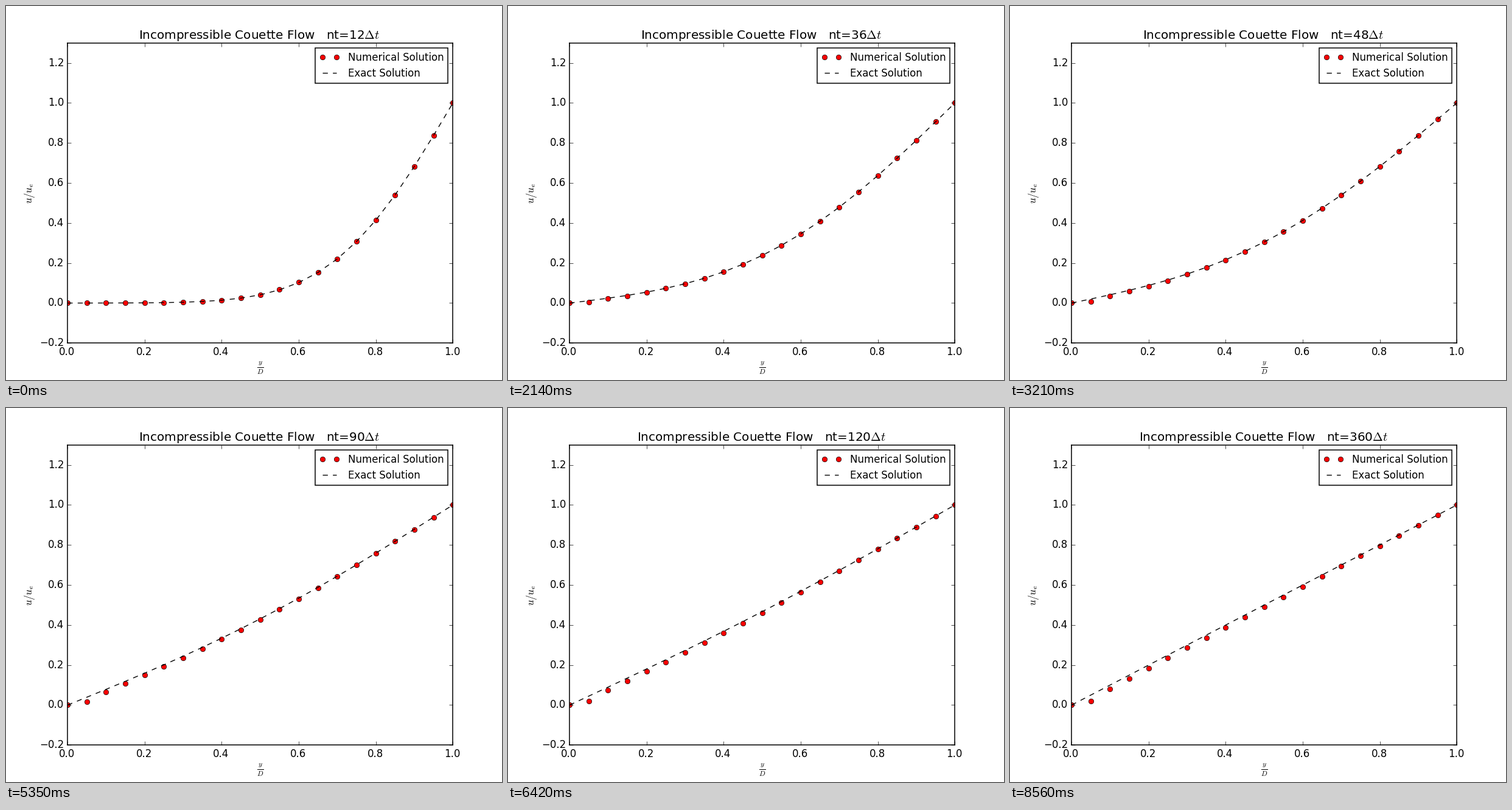
A matplotlib script for the animation above (9.63 s loop, 815 by 615 pixels).

```python
import numpy as np
import matplotlib.pyplot as plt
from matplotlib.animation import FuncAnimation
from matplotlib.transforms import ScaledTranslation

plt.style.use('classic')
plt.rcParams.update({
    'font.family': 'DejaVu Sans',
    'figure.dpi': 100,
    'savefig.dpi': 100,
    'figure.facecolor': 'white',
    'savefig.facecolor': 'white',
    'legend.fontsize': 'medium',
    'axes.labelpad': 3.5,
    'axes.linewidth': 1.09,     # rounds to two pixels when snapped
    'patch.linewidth': 1.09,
})

W, H = 815, 615             # stage in pixels
TRIM = 1                    # pixels cut from every side of the canvas

N = 20                      # grid intervals across the channel
E = 1.0                     # dt / (Re * dy^2)
DT = E / N**2               # non-dimensional time step
STEPS = [12, 24, 36, 48, 60, 90, 120, 240, 360]
HOLD = 1070                 # ms per picture

y = np.linspace(0, 1, N + 1)


def advance(u):
    """One Crank-Nicolson step, solved with the Thomas algorithm."""
    a, b = -E / 2, 1 + E
    k = np.zeros(N + 1)
    k[1:N] = (1 - E) * u[1:N] + E / 2 * (u[2:] + u[:-2])
    k[N - 1] -= a * u[N]
    d = np.full(N + 1, b)
    for j in range(2, N):
        d[j] -= a * a / d[j - 1]
        k[j] -= a * k[j - 1] / d[j - 1]
    new = u.copy()
    new[1] = k[1] / d[1]    # the wall node gets no back-substitution
    new[N - 1] = k[N - 1] / d[N - 1]
    for j in range(N - 2, 1, -1):
        new[j] = (k[j] - a * new[j + 1]) / d[j]
    return new


def exact(t):
    n = np.arange(1, 60)[:, None]
    terms = (-1.0)**n / n * np.exp(-(n * np.pi)**2 * t) * np.sin(n * np.pi * y)
    return y + 2 / np.pi * terms.sum(axis=0)


def numerical():
    u = np.zeros(N + 1)
    u[N] = 1
    out = {}
    for step in range(1, STEPS[-1] + 1):
        u = advance(u)
        if step in STEPS:
            out[step] = u
    return out


def trimmed(frac, size):
    """Figure fraction on the full canvas, as a fraction of the stage."""
    return (frac * (size + 2 * TRIM) - TRIM) / size


profiles = numerical()

fig, ax = plt.subplots(figsize=(W / 100, H / 100))
fig.subplots_adjust(left=trimmed(0.125, W), right=trimmed(0.9, W),
                    bottom=trimmed(0.1, H), top=trimmed(0.9, H))
dots, = ax.plot(y, y, 'ro', label='Numerical Solution')
curve, = ax.plot(y, y, 'k--', label='Exact Solution')
ax.set_xlim(0, 1)
ax.set_ylim(-0.2, 1.3)
ax.set_xticks(np.arange(6) / 5)
ax.set_yticks(np.arange(-1, 7) / 5)
ax.set_xlabel(r'$\frac{y}{D}$')
ax.set_ylabel(r'$u/u_e$')
ax.legend(loc='upper right')
title = ax.set_title('', x=0.498)

nudge = ScaledTranslation(-0.01, 0, fig.dpi_scale_trans)
for label in ax.get_xticklabels():
    label.set_transform(label.get_transform() + nudge)


def draw(i):
    nt = STEPS[i]
    dots.set_ydata(profiles[nt])
    curve.set_ydata(exact(nt * DT))
    title.set_text(rf'Incompressible Couette Flow   nt={nt}$\Delta t$')
    return dots, curve, title


anim = FuncAnimation(fig, draw, frames=len(STEPS), interval=HOLD, repeat=True)
plt.show()
```
